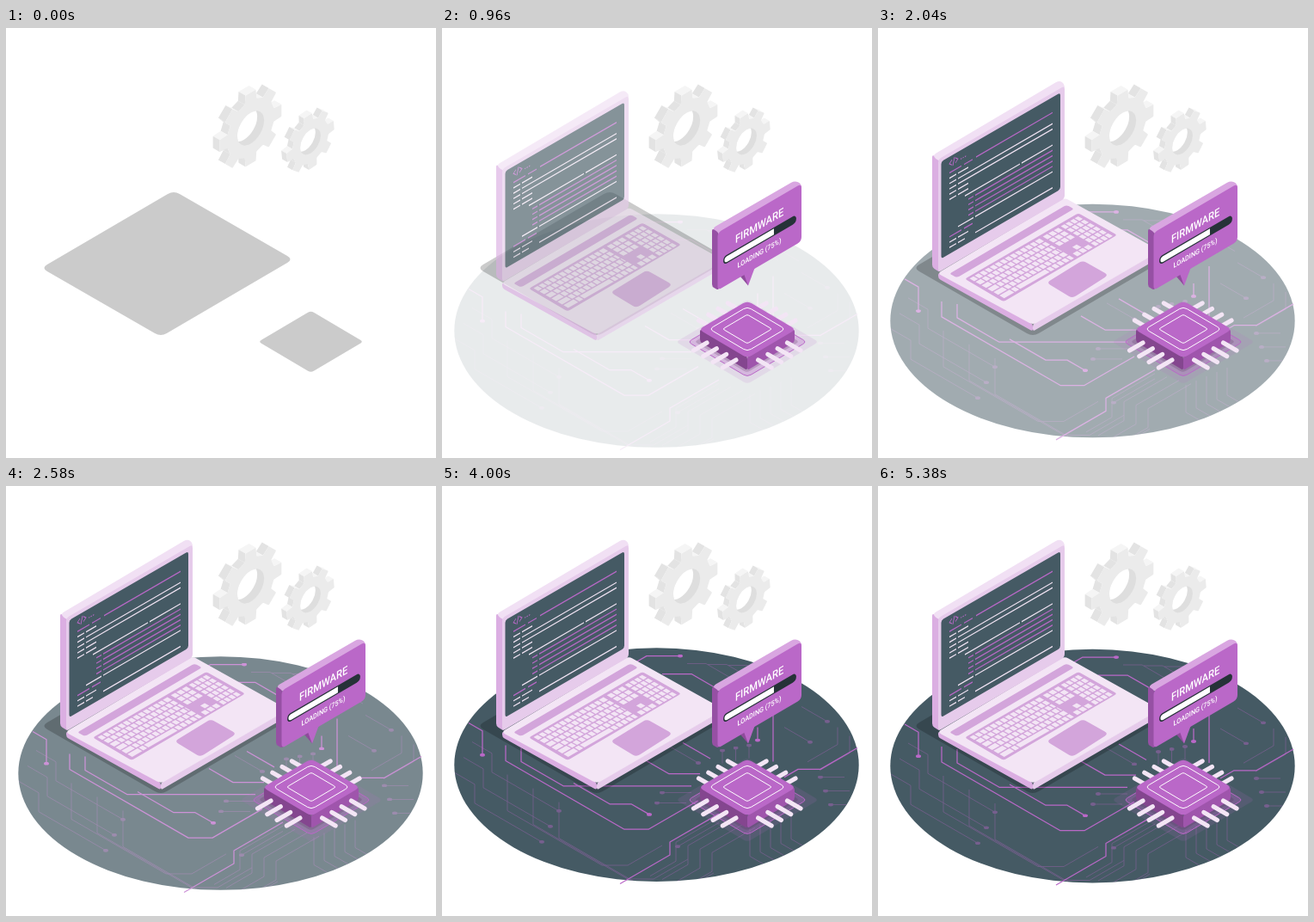
Write an HTML page that moves like this. It is 500 px wide and 500 px high and loops after 5430 ms.

```html
<!DOCTYPE html>
<html lang="en">
<head>
<meta charset="utf-8">
<title>Firmware</title>
<style>
  html, body { margin: 0; width: 100%; height: 100%; overflow: hidden; background: #fff; }
  svg { display: block; width: 100%; height: 100%; }
  text { font-family: Roboto, "Open Sans", sans-serif; }
</style>
</head>
<body>
<svg id="stage" viewBox="0 0 500 500"></svg>
<script>
const LOOP = 5430, UNIT = 1060;
const PURPLE = '#ba68c8', PALE = '#f3e5f5', SLATE = '#455a64';
const LILAC = '#d3a5db', SIDE = '#dbaee2', FRONT = '#e6cbeb';
const ISO = Math.tan(Math.PI / 6);

// Polygon with rounded corners; points are "x,y x,y ..."
function poly(points, fill, r = 0, extra = '') {
  const p = points.split(' ').map(s => s.split(',').map(Number));
  const n = p.length;
  const toward = (a, b) => {
    const len = Math.hypot(b[0] - a[0], b[1] - a[1]);
    const k = Math.min(r, len / 2) / len;
    return `${a[0] + (b[0] - a[0]) * k},${a[1] + (b[1] - a[1]) * k}`;
  };
  const d = p.map((c, i) => {
    const from = toward(c, p[(i + n - 1) % n]), to = toward(c, p[(i + 1) % n]);
    return `${i ? 'L' : 'M'}${from}Q${c} ${to}`;
  }).join('');
  return `<path d="${d}Z" fill="${fill}" ${extra}/>`;
}

const diamond = (cx, cy, w, fill, r, extra, h = w * .59) =>
  poly(`${cx - w},${cy} ${cx},${cy - h} ${cx + w},${cy} ${cx},${cy + h}`, fill, r, extra);

const strokes = (d, color, width, extra = '') =>
  `<path d="${d}" fill="none" stroke="${color}" stroke-width="${width}" stroke-linejoin="round" ${extra}/>`;

function gear(cx, cy, s, turn) {
  const ex = -8 * s, ey = -4.6 * s, pts = [];
  for (let k = 0; k < 8; k++) {
    for (const [off, r] of [[-14, 32], [-9.5, 42], [9.5, 42], [14, 32]]) {
      const a = (k * 45 + off + turn) * Math.PI / 180;
      const u = r * s * Math.cos(a), v = -r * s * Math.sin(a);
      pts.push([cx + u * .866, cy - u * .5 + v]);
    }
  }
  let out = '';
  pts.forEach((p, i) => {
    const q = pts[(i + 1) % pts.length];
    const nx = p[1] - q[1], ny = q[0] - p[0];
    if (nx * ex + ny * ey <= 0) return;
    const fill = -ny > Math.abs(nx) ? '#f5f5f5' : '#e3e3e3';
    out += poly(`${p} ${q} ${q[0] + ex},${q[1] + ey} ${p[0] + ex},${p[1] + ey}`, fill);
  });
  out += poly(pts.map(String).join(' '), '#ebebeb', .8);
  return out + `<g transform="matrix(${.866 * s},${-.5 * s},0,${s},${cx},${cy})">
    <circle r="18" fill="#dedede"/>
    <g clip-path="url(#hole)"><circle cx="-9.2" cy="-9.2" r="18" fill="#fff"/></g></g>`;
}

// Circuit trace: compass steps measured along their main axis
const COMPASS = { E: [1, 0], W: [-1, 0], N: [0, -1], S: [0, 1],
  SE: [1, ISO], NE: [1, -ISO], SW: [-1, ISO], NW: [-1, -ISO] };

function trace(x, y, steps, dot = false, width = 1.25) {
  const d = steps.split(' ').map(step => {
    const [, way, len] = step.match(/([A-Z]+)(\d+)/);
    return 'l' + COMPASS[way].map(c => c * len);
  }).join('');
  return strokes(`M${x} ${y}${d}`, PURPLE, width, dot ? 'marker-end="url(#dot)"' : '');
}

// Parallel copies of a thin trace
function fan(count, x, y, dx, dy, steps, dot = true) {
  let out = '';
  for (let i = 0; i < count; i++) out += trace(x + i * dx, y + i * dy, steps, dot, .8);
  return out;
}

function platform() {
  return `<ellipse cx="249.5" cy="325.6" rx="235.2" ry="135.8" fill="${SLATE}"/>
    <g opacity=".42" clip-path="url(#disc)">` +
    fan(3, 15, 335, 10, -18, 'SE23 S22 SE78') +
    fan(3, 76, 337, 30, 16, 'S42 SE110 E30 NE40', false) +
    fan(4, 242, 455, 14, 4, 'NE30 N22 NE50', false) +
    fan(5, 358, 400, 12, -5, 'S32 SE26', false) +
    fan(3, 398, 282, 20, -24, 'SE30') +
    fan(3, 480, 372, -6, -16, 'W28') +
    fan(2, 460, 282, 14, 10, 'S20 SW35', false) +
    fan(3, 285, 208, 24, 1, 'E22 SE60', false) +
    fan(3, 326, 324, 15.5, -3, 'N15') +
    fan(2, 290, 358, -6, 12, 'W34') +
    fan(1, 322, 393, 0, 0, 'SW48') +
    fan(1, 266, 305, 0, 0, 'SE32') + '</g>' +
    trace(31, 277, 'SE16 S28', true) +
    trace(74, 303, 'S18 SE138 E28 NE58') +
    trace(92, 306, 'S16 SE49 E149') +
    trace(153, 347, 'SE42 E25 SE21', true) +
    trace(207, 464, 'NE58 N15 NE57') +
    trace(226, 206, 'NE12 E39', true) +
    trace(256, 220, 'E34 SE28') +
    trace(385, 262, 'S60') +
    trace(483, 306, 'SW43 W26 SW16') +
    trace(236, 320, 'SE28 E36') +
    trace(367, 282, 'S15', true) +
    trace(280, 300, 'SE32');
}

function keyboard() {
  const pitch = 4.45;
  let keys = '';
  const key = (x, row, w) =>
    keys += `<rect x="${x + .5}" y="${row * 15.8 + 4.2}" width="${w - 1}" height="12.4"/>`;
  for (let row = 0; row < 6; row++) {
    const space = row === 5;
    let x = 1.5, w = pitch + row * 1.1;
    while (x < 59) {
      key(x, row, w);
      x += w;
      w = space && x > 14 && x < 20 ? 27 : pitch;
    }
    key(x, row, 64.5 - x);
    for (let c = 0; c < 3; c++) {
      if (row < 3 || space || (row === 4 && c === 1)) key(66.5 + c * 4.9, row, 4.9);
    }
    for (let c = 0; c < 4; c++) key(82.5 + c * 4.1, row, 4.1);
  }
  return poly('101,292.5 233,216 278,241.5 146,319', LILAC, 3) +
    `<g transform="matrix(1.31,-.75,.44,.25,102,292.5)" fill="${PALE}">${keys}</g>`;
}

// One letter per text row: h heading, s short, w wide, b block, p nested, o outer, e end
function code() {
  const gutter = 'M9 0H17', right = 'H129';
  const kinds = {
    h: ['M9 0H23M26 0H36', PURPLE],
    s: [gutter + 'M19 0H31', PALE],
    w: [gutter + 'M19 0' + right, PALE],
    b: ['M27 0H91M93 0' + right, PALE],
    p: ['M31 0H37M39 0' + right, PURPLE],
    o: ['M19 0H37M39 0' + right, PALE],
    e: [gutter + 'M19 0H27M39 0' + right, PALE]
  };
  let out = `<g transform="translate(0 17)">${strokes('M40 0H129', PURPLE, 1.4)}</g>`;
  [...'hswwssbppppohse'].forEach((kind, k) => {
    out += `<g transform="translate(0 ${17.5 + k * 6.2})">${strokes(...kinds[kind], 1.4)}</g>`;
  });
  out += strokes('M12 4L9 7L12 10M16 4L19 7L16 10M15 2.5L13 11.5', PURPLE, 1) +
    strokes('M22 9H29', PURPLE, 1.2, 'stroke-dasharray="1.3 1.2"');
  return `<g transform="matrix(1,-.58,0,1,74,157)">${out}</g>`;
}

function laptop() {
  return poly('70,285 180,345 180,353.5 70,292', SIDE, 3) +
    poly('180,345 327,260 327,268 180,353.5', FRONT, 3) +
    poly('69,286 217,198 328,260 180,346', PALE, 5) +
    poly('83,286.5 219,206.5 228,211 92,291', LILAC, 3) +
    keyboard() +
    poly('196,297 238,271 268,288 226,315', LILAC, 5) +
    poly('63,148 71,153 72,285 63,279', SIDE, 3) +
    poly('63,149 211,61.5 217,66 217,72 71,156', '#f1e0f4', 5) +
    poly('70,153.5 217,68 217,199 70,285', FRONT, 4) +
    poly('73.5,156 212,76 212,188.5 73.5,269', SLATE, 3) +
    code();
}

function chip() {
  const pin = (x, y, dx, dy) => `M${x} ${y}l${dx} ${dy}`;
  let back = '', front = '';
  for (let i = 0; i < 4; i++) {
    const x = i * 11.3, y = i * 6.7;
    back += pin(298.5 + x, 340 - y, 14, 8) + pin(411 - x, 340 - y, -14, 8);
    front += pin(292.5 + x, 375 + y, 15.5, -9) + pin(417 - x, 375 + y, -15.5, -9);
  }
  const pins = d => strokes(d, PALE, 5.2, 'stroke-linecap="round"');
  const outline = 'stroke="#fff" stroke-width="1"';
  return diamond(355, 365, 83, PURPLE, 5, 'opacity=".14"') +
    diamond(355, 365, 69, PURPLE, 5, 'opacity=".3"') +
    diamond(355, 365, 69, 'none', 5, `stroke="${PURPLE}" stroke-width="1"`) +
    pins(back) +
    poly('300,350 355,382 355,398 300,365', '#84468f', 3) +
    poly('410,350 355,382 355,398 410,365', '#9f55ac', 3) +
    diamond(355, 350.5, 56.5, PURPLE, 6) +
    diamond(355, 350, 44, 'none', 5, outline) +
    diamond(355, 350, 28.5, 'none', 2, outline) +
    pins(front);
}

function label() {
  const words = (s, y, size, weight) =>
    `<text x="55.5" y="${y}" font-size="${size}" font-weight="${weight}" fill="#fff" text-anchor="middle">${s}</text>`;
  return poly('347,289 356,284 356,299.5', '#8f4b9c') +
    poly('314,233 410,177.5 418,181 418,190 321,240', '#d9a6e1', 5) +
    poly('314,233 322,238 322,305 314,301', '#9650a4', 3) +
    poly('320.5,238 418,181 418,248 320.5,305', PURPLE, 5) +
    poly('351,286 364,278 356,299.5', PURPLE) +
    `<g transform="matrix(.866,-.505,0,1,321,238)">
      ${words('FIRMWARE', 24, 12.9, 500)}
      <rect x="7" y="31.8" width="98" height="9.6" rx="4.8" fill="#263238"/>
      <path d="M12 33.2H75V40H12A3.4 3.4 0 0 1 12 33.2Z" fill="#fff"/>
      ${words('LOADING (75%)', 54.5, 8.4, 500)}
    </g>`;
}

const stage = document.getElementById('stage');
stage.innerHTML = `
  <defs>
    <clipPath id="hole"><circle r="18"/></clipPath>
    <clipPath id="disc"><ellipse cx="249.5" cy="325.6" rx="235" ry="135.6"/></clipPath>
    <marker id="dot" markerUnits="userSpaceOnUse" markerWidth="6" markerHeight="4" refX="3" refY="2">
      <ellipse cx="3" cy="2" rx="3" ry="1.9" fill="${PURPLE}"/>
    </marker>
  </defs>
  ${gear(284.5, 116.5, 1, 0)}${gear(354, 132, .765, 6)}
  <g id="platform">${platform()}</g>
  <g opacity=".2">
    ${poly('41,279 195,189 334,269 180,359', '#000', 8)}
    ${diamond(354.5, 364.7, 61, '#000', 4)}
  </g>
  <g id="laptop">${laptop()}</g>
  <g id="chip">${chip()}</g>
  <g id="label">${label()}</g>`;

// cubic-bezier(.36, -.01, .5, 1.38): eases in, overshoots, settles
function ease(x) {
  if (x <= 0) return 0;
  if (x >= 1) return 1;
  const curve = (a, b, t) => 3 * (1 - t) ** 2 * t * a + 3 * (1 - t) * t * t * b + t ** 3;
  let lo = 0, hi = 1;
  for (let i = 0; i < 30; i++) {
    const mid = (lo + hi) / 2;
    if (curve(.36, .5, mid) < x) lo = mid; else hi = mid;
  }
  return curve(-.01, 1.38, lo);
}

const parts = [
  { id: 'platform', time: UNIT * 5, rise: 30 },
  { id: 'laptop', time: UNIT * 2, rise: 30 },
  { id: 'chip', time: UNIT, rise: 0 },
  { id: 'label', time: UNIT, rise: 0 }
].map(p => ({ ...p, el: document.getElementById(p.id) }));

function draw(t) {
  for (const { el, time, rise } of parts) {
    const p = ease(t / time);
    el.setAttribute('opacity', Math.max(0, Math.min(1, p)));
    el.setAttribute('transform', `translate(0 ${rise * (1 - p)})`);
  }
}

let start;
function tick(now) {
  start ??= now;
  draw((now - start) % LOOP);
  requestAnimationFrame(tick);
}
draw(0);
requestAnimationFrame(tick);
</script>
</body>
</html>
```
